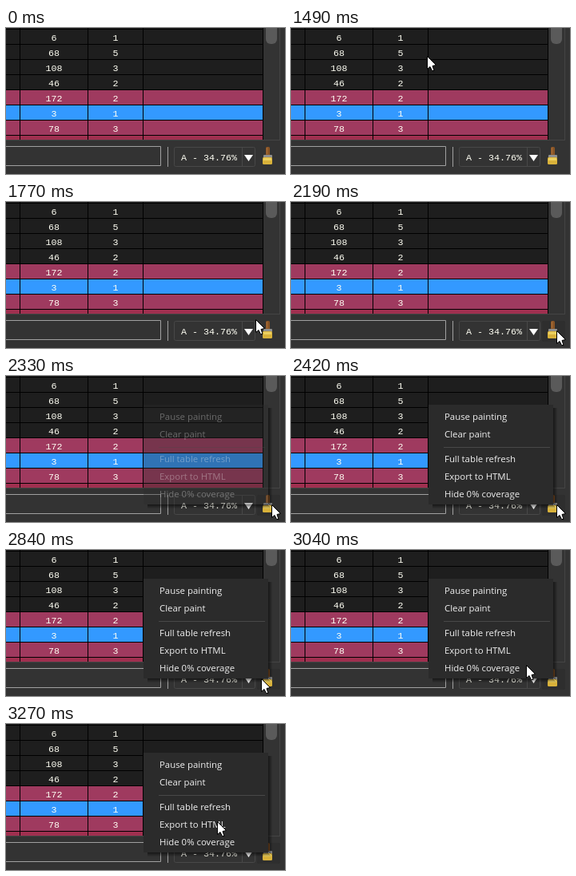
Animation, 349 px wide and 183 px high, one loop 4740 ms. Source, as an HTML page with a canvas:

```html
<!DOCTYPE html>
<html lang="en">
<head>
<meta charset="utf-8">
<style>
  html, body { margin: 0; width: 100%; height: 100%; overflow: hidden; background: #333; }
  canvas { display: block; }
</style>
</head>
<body>
<canvas width="349" height="183"></canvas>
<script>
const LOOP = 4740;
const ctx = document.querySelector('canvas').getContext('2d');
const MONO = '11.67px "Liberation Mono", "Courier New", monospace';
const SANS = '11.4px "Open Sans", "Segoe UI", sans-serif';
const PANEL = '#333', DARK = '#1e1e1e', PINK = '#9f3a5f', BLUE = '#3399ff', IVORY = '#fffff4';

const rows = [
  [6, 1, DARK], [68, 5, DARK], [108, 3, DARK], [46, 2, DARK],
  [172, 2, PINK], [3, 1, BLUE], [78, 3, PINK], ['', '', '#a03050'],
];
const menuItems = [
  ['Pause painting', 51], ['Clear paint', 73], ['Full table refresh', 104],
  ['Export to HTML', 126], ['Hide 0% coverage', 148],
];

function rect(x, y, w, h, color) {
  ctx.fillStyle = color;
  ctx.fillRect(x, y, w, h);
}

function paint(fill, stroke) {
  ctx.fillStyle = fill;
  ctx.fill();
  if (!stroke) return;
  ctx.strokeStyle = stroke;
  ctx.stroke();
}

function box(x, y, w, h, radius, fill, stroke) {
  ctx.beginPath();
  ctx.roundRect(x, y, w, h, radius);
  paint(fill, stroke);
}

function poly(points, fill, stroke) {
  ctx.beginPath();
  points.forEach(([x, y]) => ctx.lineTo(x, y));
  ctx.closePath();
  paint(fill, stroke);
}

function text(str, x, y, font, color, align = 'left') {
  ctx.font = font;
  ctx.fillStyle = color;
  ctx.textAlign = align;
  ctx.fillText(str, x, y);
}

function drawTable() {
  rect(0, 0, 322, 140, DARK);
  rows.forEach(([hits, size, color], i) => {
    const y = 2 + i * 19;
    rect(0, y, 322, Math.min(18, 140 - y), color);
    rect(0, y - 1, 322, 1, '#000');
    text(hits, 60, y + 14, MONO, IVORY, 'center');
    text(size, 137, y + 14, MONO, IVORY, 'center');
  });
  for (const x of [17, 102, 171, 321]) rect(x, 0, 1, 140, '#000');
  rect(342, 0, 1, 141, '#444');
  rect(0, 140, 343, 1, '#444');
  box(325, -20, 14, 40, 6, '#5a5a5a');
}

function drawBrush() {
  box(325, 149, 5, 11, 1.5, '#8a5526');
  rect(326, 150, 1, 8, '#a96f3a');
  box(322, 159, 11, 4, 1, '#8f8f8f');
  box(321, 162, 12, 9, 1.5, '#d9b23a');
  rect(322, 163, 10, 3, '#ecd060');
}

function drawToolbar(pressed) {
  box(-2.5, 148.5, 196, 24, 0, PANEL, '#a0a0a0');
  rect(202, 149, 1, 25, '#a0a0a0');
  box(210.5, 149.5, 101, 24, 2, PANEL, '#484848');
  rect(295, 150, 1, 24, '#484848');
  text('A - 34.76%', 219, 166, MONO, IVORY);
  poly([[298, 159], [309, 159], [303.5, 167]], '#fff');
  if (pressed) box(314, 149, 29, 26, 2, '#2e2e2e');
  drawBrush();
}

function drawMenu(alpha) {
  for (let i = 0; i < 5; i++) {
    const shade = `rgba(0,0,0,${0.5 - i * 0.1})`;
    rect(328 + i, 40, 1, 121 + i, shade);
    rect(177, 161 + i, 151 + i, 1, shade);
  }
  ctx.globalAlpha = alpha;
  rect(172, 36, 156, 125, '#2b2b2b');
  rect(191, 89, 133, 1, '#484848');
  menuItems.forEach(([label, y]) => text(label, 192, y + 4, SANS, '#f0f0f0'));
  ctx.globalAlpha = 1;
}

// Linear interpolation through [time, ...values] keys.
function along(keys, t) {
  let i = keys.findIndex(key => key[0] > t);
  if (i < 0) return keys.at(-1).slice(1);
  i = Math.max(i, 1);
  const a = keys[i - 1], b = keys[i];
  const u = (t - a[0]) / (b[0] - a[0]);
  return a.slice(1).map((v, k) => v + (b[k + 1] - v) * u);
}

const snap = (t, start, step) => start + Math.floor((t - start) / step + 1e-6) * step;
const easeOut = (u, power) => 1 - (1 - u) ** power;

const pathBack = [
  [2690, 332, 161], [2740, 331, 163], [2840, 319, 161], [3222, 269, 127], [3270, 264, 122],
];

function cursorAt(t) {
  if (t >= 2740) return along(pathBack, snap(t + 0.5, 2740, 530 / 11));
  const u = Math.min(1, (snap(t, 1490, 420 / 9) - 1490) / 420);
  return [170 + 162 * easeOut(u, 1.9), 35 + 126 * easeOut(u, 2)];
}

function drawCursor(t) {
  const [x, y] = cursorAt(t).map(Math.round);
  const shape = [[0, 0], [0, 16], [3.5, 13], [6, 18], [8.5, 18], [6.5, 12], [11, 11]];
  poly(shape.map(([dx, dy]) => [x + dx + 0.5, y + dy + 0.5]), '#fff', '#000');
}

function menuAlpha(t) {
  if (t >= 2420) return 1;
  if (t >= 2380) return 0.7;
  return t >= 2330 ? 0.35 : 0.1;
}

function draw(now) {
  const t = now % LOOP;
  rect(0, 0, 349, 183, PANEL);
  drawTable();
  drawToolbar(t >= 2190);
  if (t >= 2280) drawMenu(menuAlpha(t));
  if (t >= 1490) drawCursor(t);
}

const start = performance.now();
function tick() {
  draw(performance.now() - start);
  requestAnimationFrame(tick);
}
tick();
</script>
</body>
</html>
```
